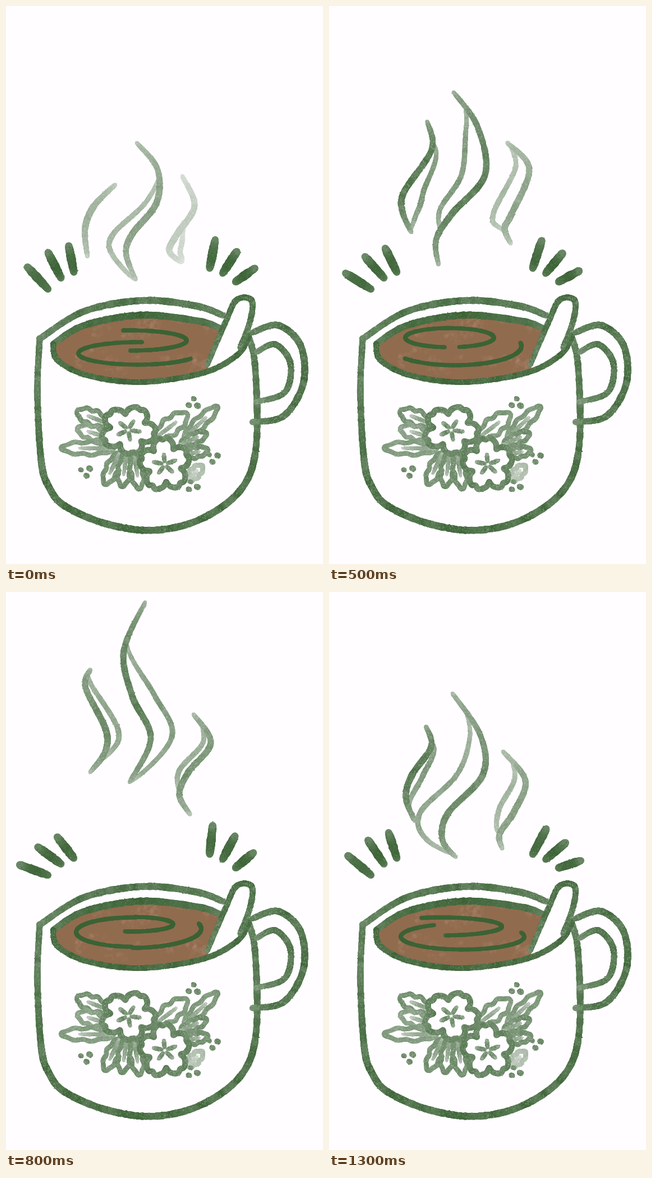
Animation of 565 by 991 pixels, one loop 1500 ms. Source, as an HTML page with a canvas:

```html
<!DOCTYPE html>
<html lang="en">
<head>
<meta charset="utf-8">
<title>Steaming mug</title>
<style>
  html, body { margin: 0; width: 100%; height: 100%; overflow: hidden; background: #fffdff; }
  canvas { display: block; }
</style>
</head>
<body>
<canvas id="stage" width="565" height="991"></canvas>
<script>
const W = 565, H = 991, PI = Math.PI;
const PAPER = [255, 253, 255], GREEN = [60, 99, 54];
const BROWN = 'rgb(145,107,77)';

let seed = 7;
function rand() {
  seed = (seed * 16807) % 2147483647;
  return seed / 2147483647;
}

function hash(x, y) {
  const s = Math.sin(x * 127.1 + y * 311.7) * 43758.5453;
  return s - Math.floor(s);
}

// Smooth value noise, 0..1
function noise(x, y) {
  const i = Math.floor(x), j = Math.floor(y);
  const ease = t => t * t * (3 - 2 * t);
  const u = ease(x - i), v = ease(y - j);
  const top = hash(i, j) * (1 - u) + hash(i + 1, j) * u;
  const low = hash(i, j + 1) * (1 - u) + hash(i + 1, j + 1) * u;
  return top * (1 - v) + low * v;
}

function ink(t) {
  t = Math.max(0, Math.min(1, t));
  return 'rgb(' + PAPER.map((p, i) => Math.round(p + (GREEN[i] - p) * t)) + ')';
}

const plot = (n, f) => Array.from({ length: n + 1 }, (_, i) => f(i / n));

// Catmull-Rom curve through the points of a string such as "0,0 10,5 20,0"
function curve(path) {
  const p = path.split(' ').map(s => s.split(',').map(Number)), last = p.length - 1;
  return plot(last * 90, u => {
    const i = Math.min(last - 1, Math.floor(u * last)), t = u * last - i;
    const a = p[Math.max(0, i - 1)], b = p[i], c = p[i + 1], d = p[Math.min(last, i + 2)];
    return [0, 1].map(m => b[m] + 0.5 * t * (c[m] - a[m] +
      t * (2 * a[m] - 5 * b[m] + 4 * c[m] - d[m] + t * (3 * (b[m] - c[m]) + d[m] - a[m]))));
  });
}

const line = (x, y, dx, dy) => plot(60, u => [x + dx * u, y + dy * u]);

// Part of an ellipse, angles counted anticlockwise
const arc = (x, y, rx, ry, from, to) => plot(300, u => {
  const a = from + (to - from) * u;
  return [x + rx * Math.cos(a), y - ry * Math.sin(a)];
});

function dot(g, x, y, r, color) {
  g.fillStyle = color;
  g.beginPath();
  g.arc(x, y, r, 0, 7);
  g.fill();
}

// Dry-brush stroke; fade thins and pales both ends
function brush(g, pts, width, tone = 1, fade = 0, grain = 0.2) {
  const at = pts.map(([x, y], i) => {
    const k = 1 - fade * (1 - Math.sqrt(Math.sin(PI * i / (pts.length - 1)) + 1e-9));
    return [x, y, width / 2 * k, tone * k];
  });
  for (const [x, y, r, t] of at) {
    dot(g, x, y, r * (0.93 + 0.2 * noise(x / 3 + 40, y / 3)), ink(t * (1 - grain * noise(x / 9, y / 9))));
  }
  if (!grain) return;
  for (const [x, y, r, t] of at) {
    const a = rand() * 2 * PI, d = r * Math.sqrt(rand()) * 1.1;
    dot(g, x + Math.cos(a) * d, y + Math.sin(a) * d, 0.6 + rand() * 0.8, ink(t * (1 - grain * 1.6 * rand())));
  }
}

function fill(g, pts, color) {
  g.fillStyle = color;
  g.beginPath();
  pts.forEach(([x, y]) => g.lineTo(x, y));
  g.fill();
}

function layer(draw) {
  const c = document.createElement('canvas');
  c.width = W;
  c.height = H;
  draw(c.getContext('2d'));
  return c;
}

const rimBack = curve('380,571 340,559 240,549 140,567 84,600');
const rimFront = curve('84,600 92,629 145,656 240,668 350,652 412,620 433,587');

function coffee(g) {
  fill(g, [...rimBack, ...rimFront.filter(p => p[0] < 359), [384, 566]], BROWN);
  g.save();
  g.clip();
  for (let i = 0; i < 1500; i++) {
    const x = 80 + rand() * 305, y = 548 + rand() * 120, n = noise(x / 26, y / 13);
    if (n > 0.55) dot(g, x, y, 1 + rand() * 3.5, `rgba(184,150,128,${(n - 0.5) * 0.4})`);
  }
  g.restore();
}

// Rippled leaf from its foot to its tip, with a vein
function leaf(g, x, y, tipX, tipY, bulge, tone = 0.78) {
  const dx = tipX - x, dy = tipY - y, len = Math.hypot(dx, dy);
  const edge = plot(200, v => {
    const u = 1 - Math.abs(1 - 2 * v), side = v < 0.5 ? 1 : -1;
    const b = side * bulge * Math.sqrt(Math.sin(PI * u) + 1e-9) * (1 + 0.15 * Math.sin(u * 6 * PI));
    return [x + dx * u - dy / len * b, y + dy * u + dx / len * b];
  });
  fill(g, edge, ink(0));
  brush(g, edge, 8, tone);
  brush(g, line(x, y, dx * 0.65, dy * 0.65), 7, tone * 0.85, 0.4);
}

// Five notched petals around a star of short marks
function blossom(g, x, y, rx, ry, turn) {
  const edge = plot(500, u => {
    const a = u * 2 * PI, r = 0.8 + 0.3 * Math.abs(Math.cos(2.5 * (a - turn))) - 0.1 * Math.cos(5 * (a - turn)) ** 8;
    return [x + rx * r * Math.cos(a), y + ry * r * Math.sin(a)];
  });
  fill(g, edge, ink(0));
  brush(g, edge, 9.5, 0.86);
  for (let i = 0; i < 5; i++) {
    const a = turn + i * 0.4 * PI, c = Math.cos(a), s = Math.sin(a);
    brush(g, line(x + 5 * c, y + 5 * s, 16 * c, 13 * s), 7, 0.82, 0.3);
  }
}

function berries(g, x, y, turn) {
  for (let i = 0; i < 3; i++) {
    const a = turn + i * 2 * PI / 3;
    brush(g, line(x + 9 * Math.cos(a), y + 8 * Math.sin(a), 2, 1), 9 - i, 0.82);
  }
}

function bouquet(g) {
  leaf(g, 182, 742, 126, 720, 13);
  leaf(g, 180, 766, 127, 750, 12, 0.65);
  leaf(g, 192, 786, 98, 785, 11, 0.7);
  for (let i = 0; i < 3; i++) leaf(g, 202 + 13 * i, 794, 176 + 31 * i, 850 + 4 * i, 11);
  leaf(g, 268, 766, 323, 724, 15, 0.72);
  leaf(g, 318, 767, 377, 711, 10, 0.72);
  leaf(g, 312, 778, 358, 759, 9);
  leaf(g, 316, 798, 360, 788, 9);
  leaf(g, 324, 842, 350, 816, 9, 0.45);
  blossom(g, 218, 753, 46, 40, -1.1);
  blossom(g, 283, 814, 42, 44, -0.4);
  berries(g, 333, 705, 0.6);
  berries(g, 368, 801, -0.4);
  berries(g, 141, 826, -0.7);
  berries(g, 331, 852, 0.2);
}

const mug = layer(g => {
  g.fillStyle = ink(0);
  g.fillRect(0, 0, W, H);
  coffee(g);
  brush(g, curve('388,550 340,533 245,523 140,542 60,591'), 12, 0.98, 0.2);
  brush(g, curve('60,590 56,690 63,810 77,855 105,888 180,920 265,931 350,910 420,857 446,780 444,640 431,583'), 12, 1, 0.15);
  brush(g, rimBack, 12, 1, 0.2, 0.1);
  brush(g, rimFront, 9.5, 1, 0, 0.15);
  brush(g, curve('359,637 391,562 411,522 438,523 435,560 417,607'), 10, 1, 0.15);
  brush(g, curve('439,580 485,567 525,603 530,670 495,728 439,739'), 11.5, 0.98, 0.15);
  brush(g, curve('446,615 480,601 507,635 497,686 446,703'), 10.5, 0.96, 0.2);
  bouquet(g);
});

// Three rays on each side, turned about the mug by the given degrees
function rays(g, left, right) {
  for (let i = 0; i < 3; i++) {
    const a = (left + 16 * (1 - i)) * PI / 180, b = (right + 22 * (i - 1)) * PI / 180;
    const m = 54 - 3 * i, n = 52 - 5 * i;
    brush(g, line(75 + 23 * i, 503 - 25 * i + 5 * i * i, -m * Math.sin(a), -m * Math.cos(a)), 15, 1, 0.2, 0.08);
    brush(g, line(363 + 23 * i, 466 + 6 * i + 3 * i * i, n * Math.sin(b), -n * Math.cos(b)), 15, 1, 0.2, 0.08);
  }
}

// A wisp with a second, paler edge that bulges away between two points
function wisp(g, [path, bulge, from, to, tone]) {
  const main = curve(path), n = main.length;
  const edge = main.slice(n * from, n * to);
  brush(g, edge.map(([x, y], i) => [x + bulge * Math.sin(PI * i / edge.length), y]), 9, tone * 0.78, 0.4);
  brush(g, main, 11, tone, 0.45);
}

const poses = [
  {
    rays: [27, 33],
    swirl: [[222, 594, 100, 18, 1.7, -1.57], [235, 617, 106, 20, 1.5, 5.8]],
    steam: [['195,317 157,355 141,395 145,445', 0, 0, 1, 0.55],
      ['233,243 270,290 268,350 225,405 214,440 231,486', -34, 0.25, 1, 0.66],
      ['314,302 336,355 305,405 291,435 312,455', 20, 0.4, 1, 0.36]]
  },
  {
    rays: [34, 50],
    swirl: [[200, 594, 108, 16, 1.9, -1.5], [238, 612, 110, 23, 2.05, 6.6]],
    steam: [['173,239 182,275 148,325 137,365 153,407', 20, 0.2, 0.85, 0.92],
      ['220,180 270,255 274,325 212,393 202,440 226,471', -52, 0.1, 0.95, 0.82],
      ['310,283 350,335 330,390 304,430 309,456', -30, 0.1, 0.75, 0.68]]
  },
  {
    rays: [42, 40],
    swirl: [[215, 589, 79, 17, 4.6, -1.35], [225, 604, 118, 34, 3.85, 6.45]],
    steam: [['175,205 183,255 134,330 131,365 147,402', 36, 0.2, 0.95, 0.94],
      ['222,153 265,215 278,300 220,368 191,415 195,459', -42, 0.1, 0.72, 0.9],
      ['318,243 357,290 325,370 313,395 324,422', -34, 0.05, 0.8, 0.62]]
  },
  {
    rays: [54, 28],
    swirl: [[225, 590, 73, 13, -1.75, 1.5], [225, 604, 100, 26, 1.5, 4.71], [225, 598, 123, 34, 4.71, 6.55]],
    steam: [['150,138 142,170 178,245 176,285 150,320', 22, 0.1, 0.85, 0.8],
      ['248,18 210,105 225,185 258,260 220,338', 44, 0.2, 1, 0.9],
      ['334,217 365,268 325,320 309,360 328,395', -20, 0.1, 0.7, 0.76]]
  }
];

const sheets = poses.map(p => layer(g => {
  g.drawImage(mug, 0, 0);
  p.steam.forEach(s => wisp(g, s));
  rays(g, ...p.rays);
  p.swirl.forEach(s => brush(g, arc(...s), 7, 1, 0, 0));
}));

// Poses in order, held for 300 and 200 ms in turn
const order = [0, 1, 2, 3, 2, 1];
const ctx = document.getElementById('stage').getContext('2d');
const start = performance.now();

function tick(now) {
  const t = Math.max(0, now - start) % 1500;
  const step = 2 * Math.floor(t / 500) + (t % 500 < 300 ? 0 : 1);
  ctx.drawImage(sheets[order[step]], 0, 0);
  requestAnimationFrame(tick);
}
tick(start);
</script>
</body>
</html>
```
